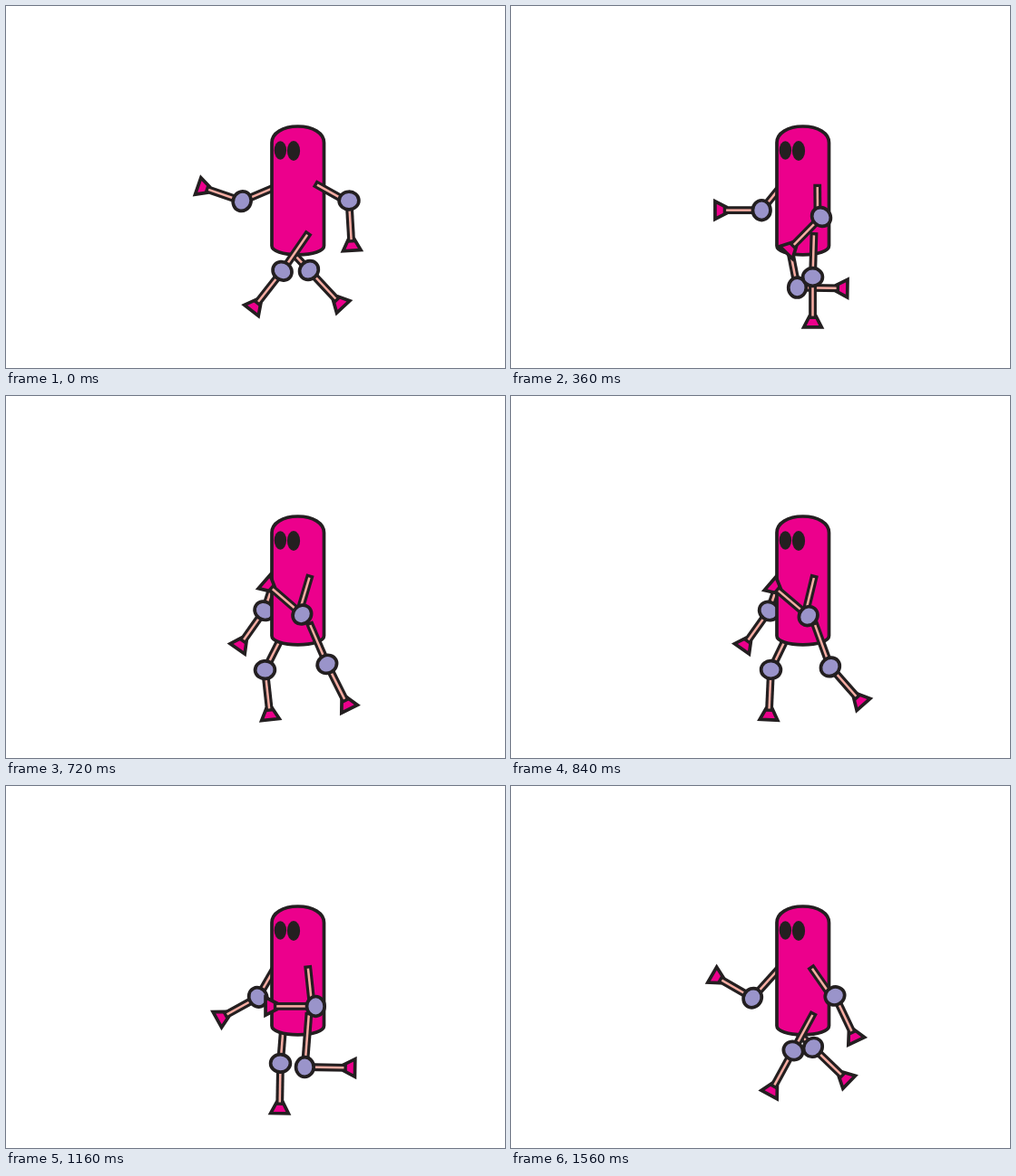
Write an HTML page with a canvas that moves like this. It is 550x400 px and loops after 1.6 s.

```html
<!DOCTYPE html>
<html lang="en">
<head>
<meta charset="utf-8">
<title>Walking figure</title>
<style>
  html, body { margin: 0; width: 100%; height: 100%; overflow: hidden; background: #fff; }
  canvas { display: block; width: 550px; height: 400px; }
</style>
</head>
<body>
<canvas id="stage" width="550" height="400"></canvas>
<script>
const ctx = document.getElementById('stage').getContext('2d');
const INK = '#231f20', PINK = '#ec008c', SKIN = '#f8ada3', JOINT = '#9a94ca';
const STEP = 40, COUNT = 40, LINE = 3.7;
const KEY_GAP = 10, LAST = COUNT - 1;

// Each limb hangs from a root and turns at two hinges.
// Poses hold the upper angle, its reach and the lower angle.
const farArm = {
  root: [297, 200], lower: 53,
  poses: [[157, 40, 199], [129, 33, 180], [106, 40, 119], [120, 38.5, 151], [132, 46, 210]]
};
const nearArm = {
  root: [340, 196], drift: [-10, 3], lean: -4, lower: 57,
  poses: [[26.6, 42.5, 86.6], [83.2, 36.6, 134.5], [103.6, 46, 230.6], [79, 46, 180], [50.7, 42.6, 64.6]]
};
const farLeg = {
  root: [306, 262], lower: 57,
  poses: [[47, 41, 47], [79, 50, 1], [121, 45, 93], [94.5, 44.5, 91], [45, 38, 44]]
};
const nearLeg = {
  root: [334, 250], lower: 57,
  poses: [[124.5, 52, 128], [91.7, 49.5, 90], [64, 50.5, 60.5], [94.4, 60.7, 1], [118.4, 48.3, 118.6]]
};

const rad = deg => deg * Math.PI / 180;
const mix = (a, b, k) => a + (b - a) * k;

// Poses fall on frames 0, 9, 19, 29 and 39.
function poseAt(poses, frame) {
  const i = Math.min(Math.floor((frame + 1) / KEY_GAP), poses.length - 2);
  const from = Math.max(0, i * KEY_GAP - 1), to = (i + 1) * KEY_GAP - 1;
  const k = (frame - from) / (to - from);
  return poses[i].map((v, n) => mix(v, poses[i + 1][n], k));
}

function paint(fill) {
  ctx.fillStyle = fill;
  ctx.fill();
  ctx.stroke();
}

function at(x, y, angle, draw) {
  ctx.save();
  ctx.translate(x, y);
  ctx.rotate(angle);
  draw();
  ctx.restore();
}

function bar(length) {
  ctx.fillStyle = INK;
  ctx.fillRect(0, -4.4, length, 8.8);
  ctx.fillStyle = SKIN;
  ctx.fillRect(3.4, -1.25, length - 6.8, 2.5);
}

function foot(end) {
  ctx.beginPath();
  ctx.moveTo(end - 14, -3.4);
  ctx.lineTo(end - 1.7, -9.8);
  ctx.lineTo(end - 1.7, 9.8);
  ctx.lineTo(end - 14, 3.4);
  ctx.closePath();
  paint(PINK);
}

function oval(x, y, rx, ry) {
  ctx.beginPath();
  ctx.ellipse(x, y, rx, ry, 0, 0, Math.PI * 2);
}

function drawLimb({ root, drift = [0, 0], lean = 0, lower, poses }, frame) {
  const [turn, reach, bend] = poseAt(poses, frame);
  const [x, y] = root.map((v, n) => v + drift[n] * frame / LAST);
  const dx = reach * Math.cos(rad(turn)), dy = reach * Math.sin(rad(turn));
  at(x, y, Math.atan2(dy, dx + lean), () => bar(reach - 3));
  at(x + dx, y + dy, rad(bend), () => {
    foot(lower);
    bar(lower - 10.5);
    oval(0, 0, 9.8, 10.9);
    paint(JOINT);
  });
}

function drawEye(x, y, rx, ry) {
  oval(x, y, rx, ry);
  ctx.fillStyle = INK;
  ctx.fill();
}

function drawBody() {
  ctx.beginPath();
  ctx.moveTo(293, 151);
  ctx.bezierCurveTo(293, 140.5, 305, 133, 321.7, 133);
  ctx.bezierCurveTo(338.5, 133, 350.5, 140.5, 350.5, 151);
  ctx.lineTo(350.5, 265);
  ctx.bezierCurveTo(350.5, 270.5, 338.5, 274.8, 321.7, 274.8);
  ctx.bezierCurveTo(305, 274.8, 293, 270.5, 293, 265);
  ctx.closePath();
  paint(PINK);
  drawEye(302.4, 159.5, 6.7, 10.2);
  drawEye(317, 160, 7.1, 11);
}

function drawFrame(frame) {
  ctx.fillStyle = '#fff';
  ctx.fillRect(0, 0, 550, 400);
  ctx.strokeStyle = INK;
  ctx.lineWidth = LINE;
  drawLimb(farArm, frame);
  drawLimb(farLeg, frame);
  drawBody();
  drawLimb(nearLeg, frame);
  drawLimb(nearArm, frame);
}

const start = performance.now();
function tick() {
  const elapsed = Math.max(0, performance.now() - start);
  drawFrame(Math.floor(elapsed / STEP) % COUNT);
  requestAnimationFrame(tick);
}
tick();
</script>
</body>
</html>
```
